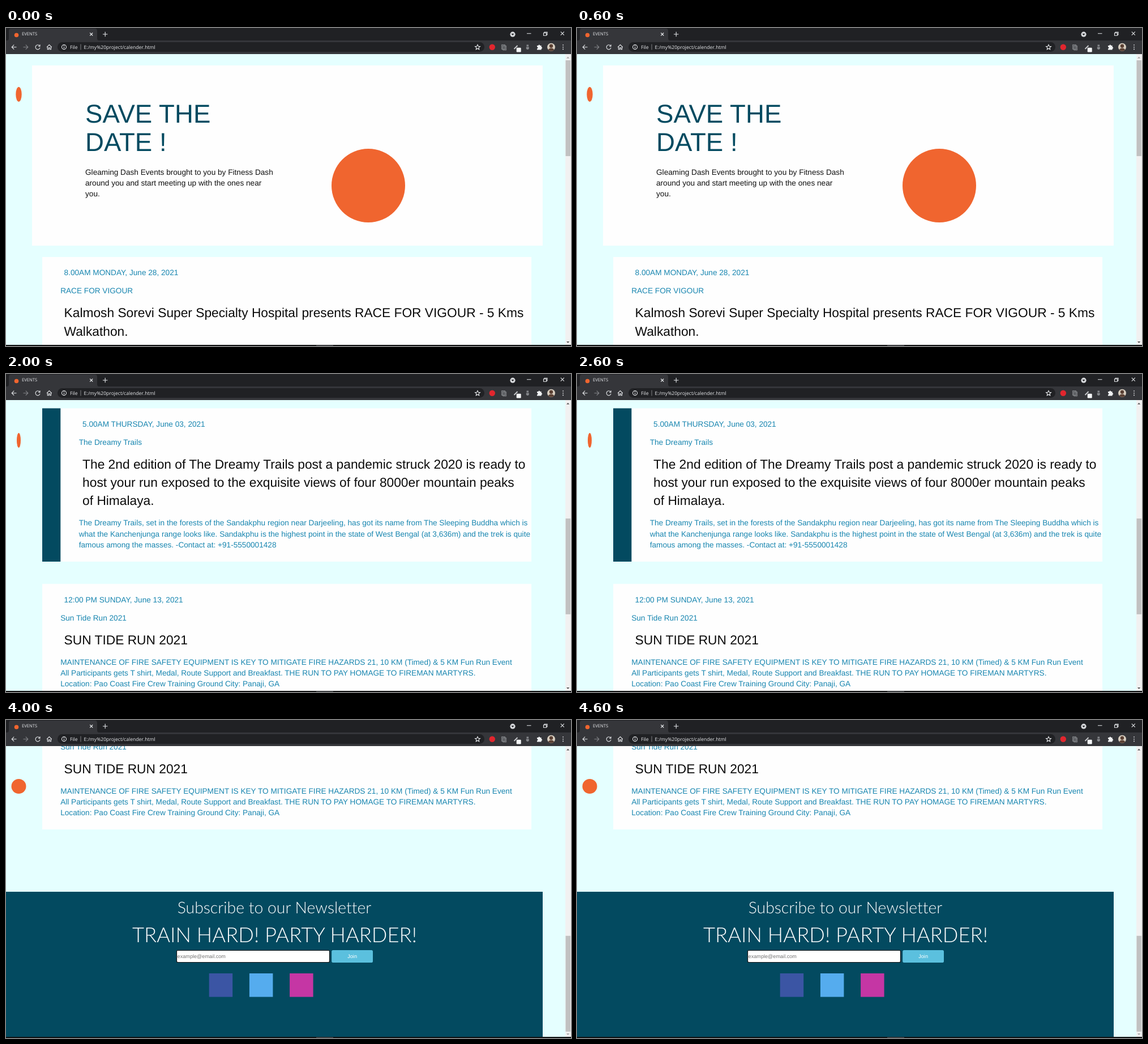
Recreate the animation shown at these times as an HTML page. Size 998 by 561 pixels, loop 5 s.

```html
<!DOCTYPE html>
<html lang="en">
<head>
<meta charset="utf-8">
<title>EVENTS</title>
<style>
  html, body { margin: 0; width: 100%; height: 100%; overflow: hidden; background: #e5ffff; }
  svg { display: block; width: 998px; height: 561px; }
  text { font: 13.64px "Liberation Sans", Arial, sans-serif; text-rendering: geometricPrecision; white-space: pre; }
  .info { fill: #1886b0; }
  .head { fill: #0b0b0b; font-size: 22.75px; }
  .lead { fill: #111; }
  .big { fill: #034a60; font-size: 45.6px; }
  .news { fill: #fff; font-family: Lato, "Open Sans", sans-serif; font-size: 28.4px; font-weight: 300; font-variant-ligatures: none; text-anchor: middle; }
  .shout { font-size: 36.4px; }
  .form { font-size: 9.15px; fill: #757575; }
  .bar { font: 8.6px "Open Sans", "Noto Sans", sans-serif; fill: #e8eaed; }
  .tab { font-size: 7.6px; }
  .icon { fill: none; stroke: #e8eaed; stroke-width: 1.1; }
</style>
</head>
<body>
<svg viewBox="0 0 998 561" xmlns="http://www.w3.org/2000/svg">
  <rect width="998" height="561" fill="#e5ffff"/>
  <g id="page">
    <rect x="46" y="66" width="902" height="318" fill="#fefefe"/>
    <circle cx="640" cy="278" r="65" fill="#f0652f"/>
  </g>
  <circle id="badge" r="13" fill="#f0652f"/>

  <g id="scrollbar">
    <rect x="988" y="46" width="10" height="514" fill="#f1f1f1"/>
    <rect id="thumb" x="988.5" width="8.5" height="169" fill="#c1c1c1"/>
    <path id="up" d="M990 53.5l2.6-2.8 2.6 2.8z"/>
    <path id="down" d="M990 553l2.6 2.8 2.6-2.8z"/>
  </g>

  <g id="browser">
    <rect width="998" height="22" fill="#202124"/>
    <rect y="22" width="998" height="24" fill="#35363a"/>
    <path d="M2 22q3 0 3-4V5q0-4 4-4H157q4 0 4 4V18q0 4 3 4z" fill="#35363a"/>
    <circle cx="18.5" cy="12.5" r="3.8" fill="#f0652f"/>
    <text class="bar tab" x="28" y="13.4">EVENTS</text>
    <path class="icon" d="M148.2 8.5l5 5m0-5l-5 5M171 11h8.4m-4.2-4.2v8.4"/>
    <circle cx="895" cy="11.2" r="4.6" fill="#d5d7da"/>
    <path d="M892.6 10h4.8l-2.4 3z" fill="#202124"/>
    <path class="icon" stroke-width=".9" d="M920 9.7h7.5M949.5 8.8h5v4.4h-5zM951 8.6V7.2h5V12h-1.4M979.8 6.6l6 6m0-6l-6 6"/>

    <rect x="91" y="25" width="754" height="17" rx="8.5" fill="#202124"/>
    <path class="icon" d="M18.5 33.7H10.2m4-4l-4 4 4 4"/>
    <path class="icon" style="stroke:#85878b" d="M30.5 33.7h8.3m-4-4l4 4-4 4"/>
    <path class="icon" d="M59.2 31.3a4 4 0 1 0 .8 3.4M60 29.2v3h-3"/>
    <path class="icon" d="M72 33.8l4.4-4.2 4.4 4.2M73.3 33v4.8h2.1v-3h2v3h2.1V33"/>
    <circle class="icon" cx="102.5" cy="33.6" r="4"/>
    <path class="icon" d="M102.5 33v2.8m0-4.7v1"/>
    <text class="bar" x="113" y="36.7">File</text>
    <path d="M132 28.5v10" stroke="#9a9c9f" stroke-width=".8"/>
    <text class="bar" x="137.6" y="36.7">E:/my%20project/calender.html</text>

    <path class="icon" stroke-width=".9" d="M833 29.4l1.3 2.9 3.1.3-2.4 2.1.7 3.1-2.7-1.6-2.7 1.6.7-3.1-2.4-2.1 3.1-.3z"/>
    <circle cx="858.8" cy="33.7" r="5.2" fill="#e2262e"/>
    <path d="M875.5 29.5h6v8h-6zM877.6 31.5h6v7.5h-6z" fill="#55575b" stroke="#909296" stroke-width=".8"/>
    <path d="M897.5 37l6-6" stroke="#c8cacd" stroke-width="1.8"/>
    <rect x="901.7" y="34.8" width="8" height="7.6" rx="1.2" fill="#f5f7f8"/>
    <path d="M919.5 29.5h3.6v3h-3.6zM918.8 33.5h5v3q-2.5 3-5 0z" fill="#85878b"/>
    <path d="M938 31h2.3a1.5 1.5 0 0 1 3 0h2.3v2.5a1.5 1.5 0 0 1 0 3V38.5H938v-2.3a1.5 1.5 0 0 0 0-3z" fill="#f1f3f4"/>
    <clipPath id="round"><circle cx="963" cy="33.7" r="7"/></clipPath>
    <g clip-path="url(#round)">
      <rect x="956" y="26" width="14" height="15" fill="#d8cec0"/>
      <circle cx="963" cy="31.7" r="3.2" fill="#5b4134"/>
      <ellipse cx="963" cy="40" rx="5.4" ry="4.6" fill="#5b4134"/>
    </g>
    <path d="M984 29.2v1.6m0 2.1v1.6m0 2.1v1.6" stroke="#e8eaed" stroke-width="1.6"/>
    <rect y="559" width="998" height="2" fill="#101112"/>
    <rect x="548" y="559.6" width="30" height="1.4" fill="#4a4d50"/>
  </g>
</svg>
<script>
const $ = id => document.getElementById(id);
const SCROLL = [0, 329, 602, 864, 985];
const TURN = [0.4, 1, 0.27, 0, -1];   // apparent width of the spinning badge
const HOVER_STEP = 2;
const NAVY = '#034a60';

const text = (cls, x, y, s) => `<text class="${cls}" x="${x}" y="${y}">${s}</text>`;
const lines = (cls, x, y, gap, list) => list.map((s, i) => text(cls, x, y + i * gap, s)).join('');
const rect = (x, y, w, h, fill, more = '') =>
  `<rect x="${x}" y="${y}" width="${w}" height="${h}" fill="${fill}" ${more}/>`;

function card(id, top, height, data, hover) {
  const x = hover ? 128.7 : 96.2;
  const bodyTop = 110.2 + data.head.length * 32.2;
  return `<g id="${id}">` + rect(64, top, 864, height, '#fefefe') +
    (hover ? rect(64, top, 32.3, height, NAVY) : '') +
    text('info', x + 6.4, top + 32.3, data.date) +
    text('info', x, top + 64.4, data.name) +
    lines('head', x + 6.4, top + 106.4, 32.2, data.head) +
    lines('info', x, top + bodyTop, 19.25, data.body) + '</g>';
}

const walk = {
  date: '8.00AM MONDAY, June 28, 2021',
  name: 'RACE FOR VIGOUR',
  head: ['Kalmosh Sorevi Super Specialty Hospital presents RACE FOR VIGOUR - 5 Kms', 'Walkathon.'],
  body: [
    '- Certificates to all participants - Refreshments, medical facilities available - T-Shirts will be distributed on 28th Feb 2021, after completing',
    'your registration - Registration is free of cost -For more details feel free to call us on the below number: Call Centre +91 11 5550 0142'
  ]
};
const trail = {
  date: '5.00AM THURSDAY, June 03, 2021',
  name: 'The Dreamy Trails',
  head: ['The 2nd edition of The Dreamy Trails post a pandemic struck 2020 is ready to',
    'host your run exposed to the exquisite views of four 8000er mountain peaks of', 'Himalaya.'],
  body: [
    'The Dreamy Trails, set in the forests of the Sandakphu region near Darjeeling, has got its name from The Sleeping Buddha which is what',
    'the Kanchenjunga range looks like. Sandakphu is the highest point in the state of West Bengal (at 3,636m) and the trek is quite famous',
    'among the masses. -Contact at: +91-5550001428'
  ]
};
const trailNarrow = {
  ...trail,
  head: [trail.head[0], 'host your run exposed to the exquisite views of four 8000er mountain peaks', 'of Himalaya.'],
  body: [
    'The Dreamy Trails, set in the forests of the Sandakphu region near Darjeeling, has got its name from The Sleeping Buddha which is',
    'what the Kanchenjunga range looks like. Sandakphu is the highest point in the state of West Bengal (at 3,636m) and the trek is quite',
    'famous among the masses. -Contact at: +91-5550001428'
  ]
};
const tide = {
  date: '12:00 PM SUNDAY, June 13, 2021',
  name: 'Sun Tide Run 2021',
  head: ['SUN TIDE RUN 2021'],
  body: [
    'MAINTENANCE OF FIRE SAFETY EQUIPMENT IS KEY TO MITIGATE FIRE HAZARDS 21, 10 KM (Timed) &amp; 5 KM Fun Run Event',
    'All Participants gets T shirt, Medal, Route Support and Breakfast. THE RUN TO PAY HOMAGE TO FIREMAN MARTYRS.',
    'Location: Pao Coast Fire Crew Training Ground City: Panaji, GA'
  ]
};

const social = ['#3b55a4', '#55acee', '#c536a4']
  .map((c, i) => rect(358.7 + i * 71.2, 1432, 41.5, 41.5, c)).join('');

$('page').insertAdjacentHTML('beforeend',
  lines('big', 140, 166.6, 50, ['SAVE THE', 'DATE !']) +
  lines('lead', 140, 258.7, 19.25, [
    'Gleaming Dash Events brought to you by Fitness Dash',
    'around you and start meeting up with the ones near', 'you.']) +
  card('walk', 404, 219, walk) +
  card('trail', 662.5, 270.5, trail) +
  card('trailHover', 662.5, 270.5, trailNarrow, true) +
  card('tide', 972.3, 205.7, tide) +
  rect(0, 1288, 948, 260, NAVY) +
  text('news', 474, 1326, 'Subscribe to our Newsletter') +
  text('news shout', 474.5, 1377, 'TRAIN HARD! PARTY HARDER!') +
  rect(301.5, 1391.5, 270, 21, '#fff', 'rx="2" stroke="#151515" stroke-width="1.2"') +
  text('form', 302.6, 1405, 'example@email.com') +
  rect(575.2, 1391, 72.8, 22, '#5bc0de', 'rx="2.5"') +
  '<text class="form" x="611.6" y="1405.2" text-anchor="middle" style="fill:#fff">Join</text>' +
  social);

function draw(now) {
  const step = Math.floor(now % 5000 / 1000);
  const y = SCROLL[step], hover = step === HOVER_STEP;
  $('page').setAttribute('transform', `translate(0 ${-y})`);
  $('trail').style.display = hover ? 'none' : '';
  $('trailHover').style.display = hover ? '' : 'none';
  $('thumb').setAttribute('y', 57 + y * 0.3287);
  $('up').setAttribute('fill', y === 0 ? '#a3a3a3' : '#505050');
  $('down').setAttribute('fill', y === 985 ? '#a3a3a3' : '#505050');
  $('badge').setAttribute('transform', `translate(22.5 117) scale(${TURN[step]} 1)`);
  $('badge').style.display = TURN[step] ? '' : 'none';
}

const start = performance.now();
function tick() {
  draw(performance.now() - start);
  requestAnimationFrame(tick);
}
tick();
</script>
</body>
</html>
```
